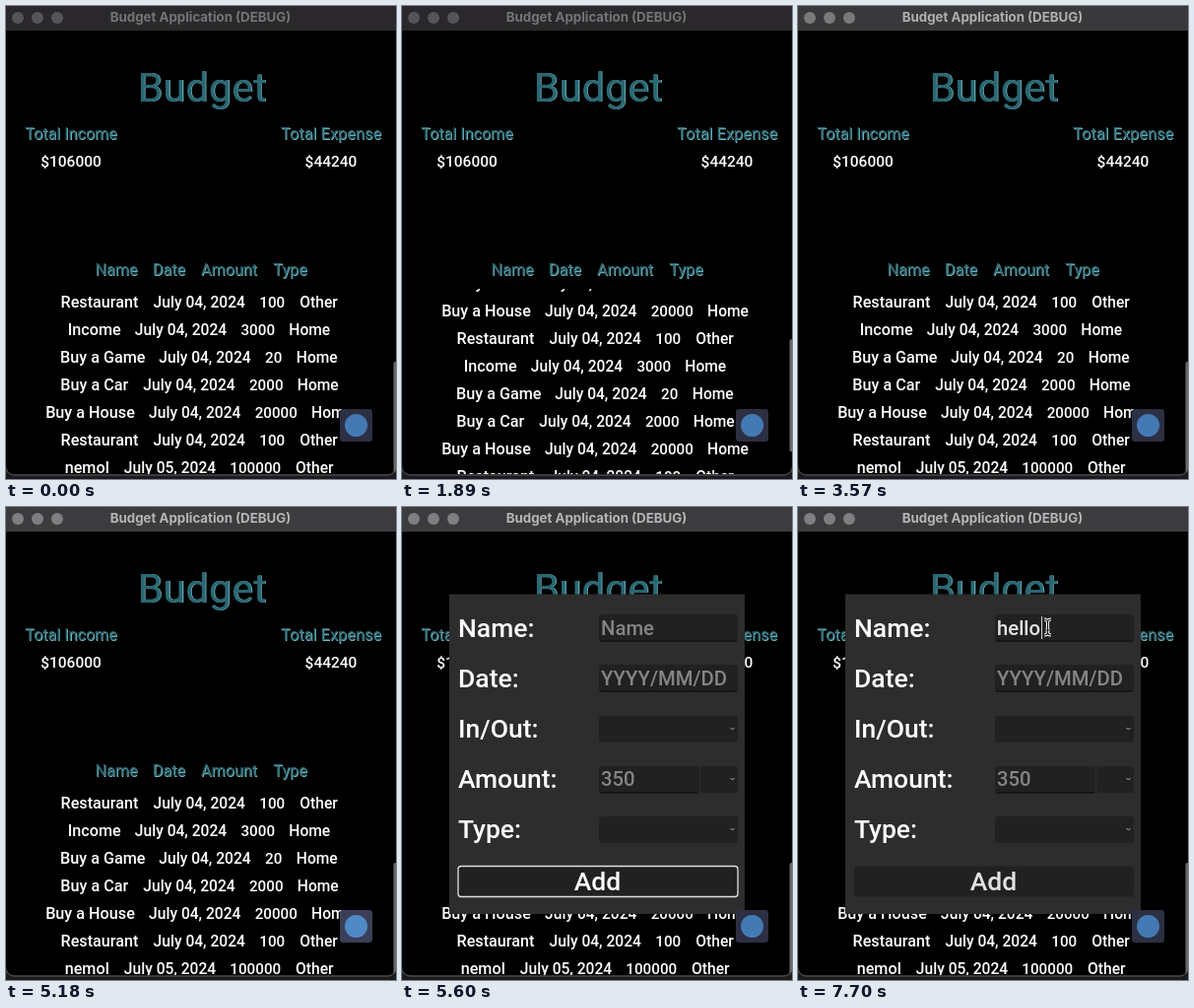
Recreate the animation shown at these times as an HTML page with a canvas. Size 396 by 480 pixels, loop 8 s.

```html
<!DOCTYPE html>
<html lang="en">
<head>
<meta charset="utf-8">
<title>Budget Application</title>
<style>
  html, body { margin: 0; width: 100%; height: 100%; overflow: hidden; background: #000; }
  canvas { display: block; }
</style>
</head>
<body>
<canvas id="stage" width="396" height="480"></canvas>
<script>
const ctx = document.getElementById('stage').getContext('2d');
const LOOP = 8000, TICK = 70, ROW_H = 28, GAP = 15, DIGIT_W = 8.5, DATE_W = 92.5;

// Name, slot width, date, amount, type
const income = ['Income', 53, 'July 04, 2024', '3000', 'Home'];
const game = ['Buy a Game', 85, 'July 04, 2024', '20', 'Home'];
const car = ['Buy a Car', 70, 'July 04, 2024', '2000', 'Home'];
const house = ['Buy a House', 90, 'July 04, 2024', '20000', 'Home'];
const meal = ['Restaurant', 80, 'July 04, 2024', '100', 'Other'];
const cycle = [income, game, car, house, meal];
const rows = [...cycle, ...cycle, ['nemol', 46, 'July 05, 2024', '100000', 'Other']];
const MAX_SCROLL = 4 * ROW_H;

const clamp = v => Math.min(1, Math.max(0, v));
const within = (t, from, to) => t >= from && t < to;

function text(str, x, y, size, color = '#fff', align = 'left', font = 'Roboto', weight = 500) {
  ctx.font = `${weight} ${size}px ${font}, sans-serif`;
  ctx.textAlign = align;
  ctx.fillStyle = color;
  ctx.fillText(str, x, y);
}

function box(x, y, w, h, r, fill, stroke) {
  ctx.beginPath();
  ctx.roundRect(x, y, w, h, r);
  if (fill) { ctx.fillStyle = fill; ctx.fill(); }
  if (stroke) { ctx.strokeStyle = stroke; ctx.lineWidth = 1.3; ctx.stroke(); }
}

function disc(x, y, r, color) {
  ctx.beginPath();
  ctx.arc(x, y, r, 0, 7);
  ctx.fillStyle = color;
  ctx.fill();
}

function teal(str, x, y, size) {
  text(str, x + 0.8, y + 0.8, size, '#78bcc4', 'center', 'Roboto', 400);
  text(str, x, y, size, '#296873', 'center', 'Roboto', 400);
}

function titleBar(t) {
  const [bar, label, dot] = t < 3570 ? ['#2a282b', '#757476', '#565457']
    : t < 3640 ? ['#39383a', '#b0afb1', '#7a797b']
    : ['#3c3b3d', '#b6b5b7', '#7f7e80'];
  ctx.fillStyle = bar;
  ctx.fillRect(0, 0, 396, 25);
  for (const x of [12, 32, 52]) disc(x, 12, 6, dot);
  text('Budget Application (DEBUG)', 197.5, 16, 13.3, label, 'center', 'Inter', 700);
}

function summary() {
  teal('Budget', 199, 96.5, 41.5);
  teal('Total Income', 66, 135, 16.1);
  teal('Total Expense', 330, 135, 16.4);
  text('$106000', 66, 163, 15.5, '#fff', 'center');
  text('$44240', 330, 163, 15.5, '#fff', 'center');
  teal('Name', 112, 273, 16.2);
  teal('Date', 165.5, 273, 16.2);
  teal('Amount', 226.5, 273, 16.2);
  teal('Type', 288.5, 273, 16.2);
}

function list(t) {
  const up = clamp((t - 1190) / 210), down = clamp((t - 1750) / 210);
  const scroll = MAX_SCROLL * (1 - up + down);
  ctx.save();
  ctx.beginPath();
  ctx.rect(0, 287, 396, 188);
  ctx.clip();
  rows.forEach(([name, nameW, date, amount, type], i) => {
    const widths = [nameW, DATE_W, amount.length * DIGIT_W, type === 'Home' ? 41 : 39];
    const sizes = [16.2, 15.6, 15.2, 15.6];
    let x = 196 - (widths.reduce((a, b) => a + b) + 3 * GAP) / 2;
    [name, date, amount, type].forEach((cell, k) => {
      text(cell, x + widths[k] / 2, 306 + i * ROW_H - scroll, sizes[k], '#fff', 'center');
      x += widths[k] + GAP;
    });
  });
  box(393.5, 293 + scroll * 68 / MAX_SCROLL, 4, 114, 2, '#6a6a6a');
  ctx.restore();
}

function menuButton(t) {
  const hover = within(t, 4060, 4830) || within(t, 5180, 5530);
  box(339, 409, 33, 33, 3, hover ? '#3b3e56' : '#2d2f42');
  disc(355.5, 425.5, 11.5, hover ? '#4f8ac6' : '#447ab4');
}

function field(x, y, w, h) {
  box(x, y, w, h, 3, '#212121');
}

function lineEdit(y, w) {
  field(200, y, w, 28);
  ctx.fillStyle = '#171717';
  ctx.fillRect(201, y + 26, w - 2, 2);
}

function dropdown(x, y) {
  field(x, y, 341 - x, 27);
  ctx.beginPath();
  ctx.moveTo(333.5, y + 12);
  ctx.lineTo(335.5, y + 14);
  ctx.lineTo(337.5, y + 12);
  ctx.strokeStyle = '#b0b0b0';
  ctx.lineWidth = 1;
  ctx.stroke();
}

function beam(x, y) {
  ctx.beginPath();
  for (const s of [-1, 1]) {
    ctx.moveTo(x - 3.5, y + 8 * s);
    ctx.quadraticCurveTo(x, y + 8 * s, x, y + 5 * s);
    ctx.quadraticCurveTo(x, y + 8 * s, x + 3.5, y + 8 * s);
  }
  ctx.moveTo(x, y - 6);
  ctx.lineTo(x, y + 6);
  ctx.moveTo(x - 2, y + 3);
  ctx.lineTo(x + 2, y + 3);
  for (const [color, width] of [['#fff', 3.2], ['#111', 1.2]]) {
    ctx.strokeStyle = color;
    ctx.lineWidth = width;
    ctx.stroke();
  }
}

function dialog(t) {
  ctx.fillStyle = '#2d2d2d';
  ctx.fillRect(48, 88.5, 300, 324.5);
  ['Name:', 'Date:', 'In/Out:', 'Amount:', 'Type:'].forEach((label, i) =>
    text(label, 57, 131.5 + i * 51.2, 26.5));

  lineEdit(109, 141);
  lineEdit(160, 141);
  dropdown(200, 212);
  lineEdit(263, 102);
  dropdown(303, 263);
  dropdown(200, 314);

  const hint = '#858585';
  const typed = 'hello'.slice(0, [7070, 7140, 7350, 7490, 7700].filter(k => t >= k).length);
  text(typed || 'Name', 202, 130, 20.3, typed ? '#e4e4e4' : hint);
  if (t >= 6160) {
    const end = typed ? ctx.measureText(typed).width + 1 : 0;
    ctx.fillStyle = '#d8d8d8';
    ctx.fillRect(202 + end, 111, 1, 23);
  }
  text('YYYY/MM/DD', 202, 181, 20.3, hint);
  text('350', 202, 283, 20.3, hint);

  const hover = within(t, 5530, 5600);
  box(57, 364.5, 284, 31, 3, hover ? '#393939' : '#212121', t < 6160 && '#e0e0e0');
  text('Add', 198.5, 388.5, 26.5, t < 6160 ? '#fff' : '#e2e2e2', 'center');
  if (t >= 6790) beam(253.5, 122);
}

function draw(now) {
  const t = Math.floor((now % LOOP) / TICK) * TICK;
  ctx.fillStyle = '#1b1b1c';
  ctx.fillRect(0, 0, 396, 480);
  ctx.save();
  box(-0.5, -12, 397, 488, 9, '#000', '#4a4a4b');
  ctx.clip();
  titleBar(t);
  summary();
  list(t);
  if (t >= 5320) dialog(t);
  menuButton(t);
  ctx.restore();
}

function loop() {
  draw(performance.now());
  requestAnimationFrame(loop);
}
loop();
</script>
</body>
</html>
```
